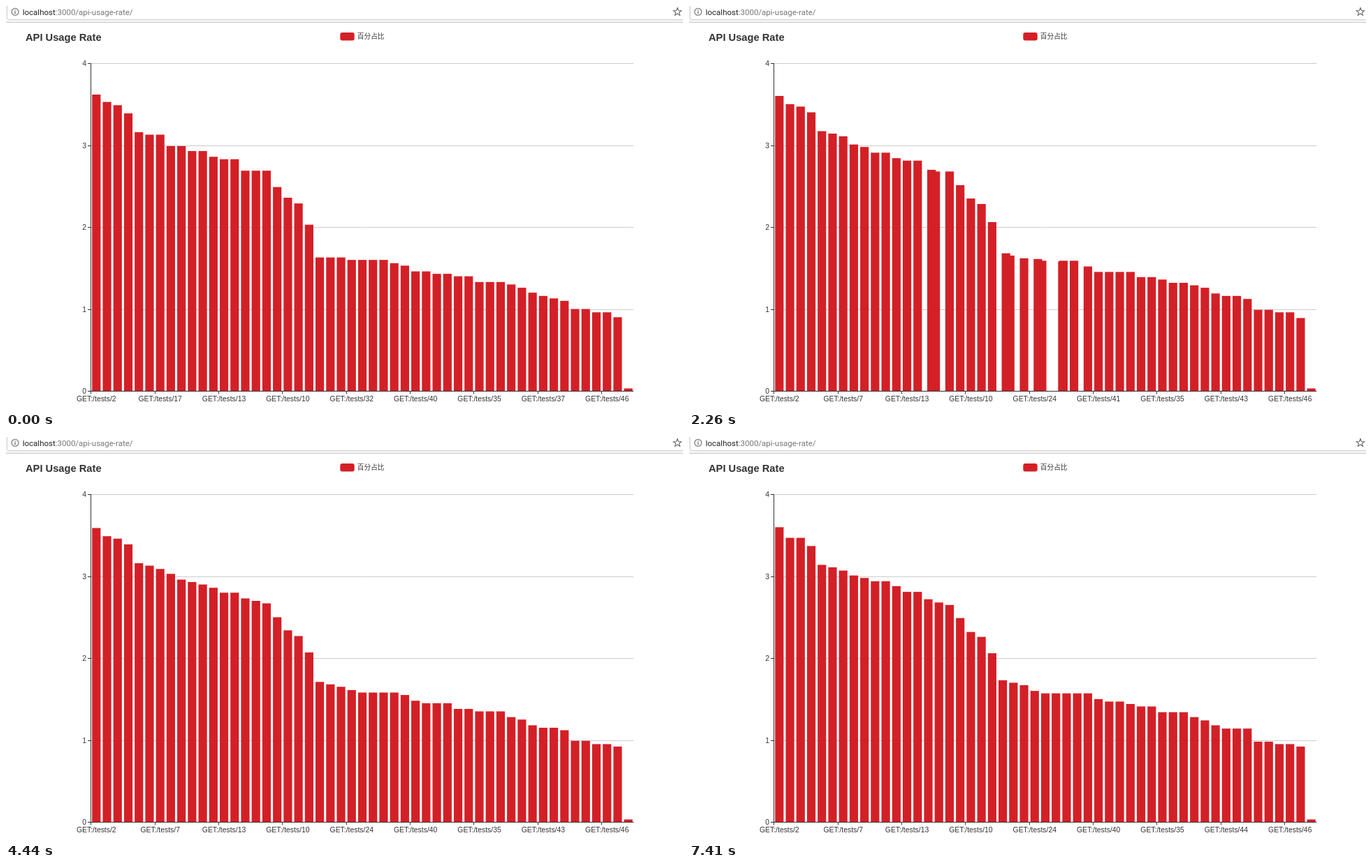
Write an HTML page with a canvas that moves like this. It is 969x578 px and loops after 8 s.

```html
<!DOCTYPE html>
<html lang="en">
<head>
<meta charset="utf-8">
<title>API Usage Rate</title>
<style>
html, body { margin: 0; width: 100%; height: 100%; overflow: hidden; background: #fff; }
canvas { display: block; }
</style>
</head>
<body>
<canvas id="stage" width="969" height="578"></canvas>
<script>
const ctx = document.getElementById('stage').getContext('2d');
const LOOP = 8000, PERIOD = 1000, FIRST_UPDATE = 161, EASE_MS = 300;
const RED = '#d32027', INK = '#333';
const LEFT = 121.7, RIGHT = 898.3, BASE = 552, UNIT = 117.4, LABEL_EVERY = 6;

// Moments at which the screen is refreshed
const REFRESH = [0, 290, 470, 1210, 1360, 1510, 2260, 2430, 3180, 3330, 3480,
  4260, 4440, 5180, 5330, 5480, 6220, 6370, 6520, 7260, 7410];

// Request counts per endpoint, highest first
const COUNTS = [109, 106, 105, 102, 95, 94, 94, 90, 90, 88, 88, 86, 85, 85, 81, 81, 81,
  75, 71, 69, 61, 49, 49, 49, 48, 48, 48, 48, 47, 46, 44, 44, 43, 43, 42, 42, 40, 40, 40,
  39, 38, 36, 35, 34, 33, 30, 30, 29, 29, 27, 1];
const NAMES = { 0: 2, 5: 7, 6: 17, 12: 13, 18: 10, 24: 32, 25: 24, 30: 40, 33: 41,
  36: 35, 42: 37, 43: 44, 44: 43, 48: 46 };

// New requests each second: a rank, or "rank>new rank" when the bar overtakes others
const HITS = [
  '3 6>5 7 21 32 44',
  '5>4 17 22>21 33>30 36 44>42',
  '15>14 20 20 22>21 25>24 28>26',
  '10>9 16>14 23>21 21 29 49',
  '7 11 14 21 31>30 37 38',
  '9 10 11 30 31 44>42',
  '10>9 12 21 23 29>27 34',
  '0 2 8 13 22 32 35'
];

const band = (RIGHT - LEFT) / COUNTS.length;
const states = buildStates();

function snapshot(items) {
  const total = items.reduce((sum, item) => sum + item.count, 0);
  const bars = [];
  items.forEach((item, rank) => {
    bars[item.id] = { rank, value: Math.round(1e4 * item.count / total) / 100 };
  });
  return { bars, names: items.map(item => NAMES[item.id]) };
}

function buildStates() {
  const items = COUNTS.map((count, id) => ({ id, count }));
  const list = [snapshot(items)];
  for (const second of HITS) {
    for (const hit of second.split(' ')) {
      const [from, to = from] = hit.split('>').map(Number);
      const [item] = items.splice(from, 1);
      item.count++;
      items.splice(to, 0, item);
    }
    list.push(snapshot(items));
  }
  return list;
}

function text(str, x, y, font, color = INK, align = 'left') {
  ctx.font = font;
  ctx.fillStyle = color;
  ctx.textAlign = align;
  ctx.fillText(str, x, y);
}

function line(x1, y1, x2, y2, color, width = 1) {
  ctx.strokeStyle = color;
  ctx.lineWidth = width;
  ctx.beginPath();
  ctx.moveTo(x1, y1);
  ctx.lineTo(x2, y2);
  ctx.stroke();
}

function roundBox(x, y, w, h, r) {
  ctx.beginPath();
  ctx.roundRect(x, y, w, h, r);
}

function drawStar(cx, cy, r) {
  ctx.beginPath();
  for (let i = 0; i < 10; i++) {
    const a = -Math.PI / 2 + i * Math.PI / 5, d = i % 2 ? r * 0.42 : r;
    ctx.lineTo(cx + d * Math.cos(a), cy + d * Math.sin(a));
  }
  ctx.closePath();
  ctx.strokeStyle = '#666';
  ctx.lineWidth = 1.1;
  ctx.stroke();
}

function drawAddressBar() {
  const font = '11.5px Roboto, sans-serif';
  ctx.fillStyle = '#f4f4f4';
  ctx.fillRect(0, 0, 969, 23);
  roundBox(1.5, -12, 990, 31.5, 4);
  ctx.fillStyle = '#fff';
  ctx.fill();
  ctx.strokeStyle = '#cfcfcf';
  ctx.lineWidth = 1;
  ctx.stroke();
  line(0, 23.5, 969, 23.5, '#cacaca');

  ctx.strokeStyle = '#666';
  ctx.lineWidth = 1.1;
  ctx.beginPath();
  ctx.arc(13, 8.3, 5, 0, 7);
  ctx.stroke();
  line(13, 7.5, 13, 11.2, '#666', 1.3);
  line(13, 5.3, 13, 6.6, '#666', 1.3);

  text('localhost', 23.7, 12.6, font, '#222');
  const host = ctx.measureText('localhost').width;
  text(':3000/api-usage-rate/', 23.7 + host, 12.6, font, '#777');
  drawStar(961, 8.5, 6);
}

function drawHeader() {
  text('API Usage Rate', 28, 50.2, 'bold 14.7px "Liberation Sans", sans-serif');
  roundBox(478.3, 38, 20.4, 11.4, 3);
  ctx.fillStyle = RED;
  ctx.fill();
  text('百分占比', 502.8, 47.2, '9.7px "Noto Sans CJK SC", "Noto Sans CJK", sans-serif');
}

function drawAxes(names) {
  const font = '10.4px "Liberation Sans", sans-serif';
  for (let v = 0; v <= 4; v++) {
    const y = Math.round(BASE - v * UNIT) + 0.5;
    line(117, y, 122, y, INK);
    text(v, 115, y + 3.4, font, INK, 'right');
  }
  line(121.5, 82, 121.5, BASE + 1, INK);
  line(121, BASE + 0.5, RIGHT, BASE + 0.5, INK);
  for (let i = 0; i < names.length; i += LABEL_EVERY) {
    const x = LEFT + i * band;
    line(Math.floor(x) + 0.5, BASE, Math.floor(x) + 0.5, BASE + 4.5, INK);
    text('GET:/tests/' + names[i], x + band / 2, 566.8, font, INK, 'center');
  }
}

function drawBars(before, after, p) {
  const mix = (a, b) => a + (b - a) * p;
  ctx.fillStyle = RED;
  after.bars.forEach((bar, id) => {
    const old = before.bars[id];
    const x = LEFT + (mix(old.rank, bar.rank) + 0.1) * band;
    const h = mix(old.value, bar.value) * UNIT;
    ctx.fillRect(x, BASE - h, band * 0.8, h);
  });
}

function draw(time) {
  const clock = time + PERIOD - FIRST_UPDATE;
  const step = Math.floor(clock / PERIOD);
  const progress = Math.min(1, clock % PERIOD / EASE_MS);
  const after = states[step], before = states[Math.max(0, step - 1)];

  ctx.fillStyle = '#fff';
  ctx.fillRect(0, 0, 969, 578);
  drawAddressBar();
  drawHeader();
  for (let v = 1; v <= 4; v++) {
    const y = Math.round(BASE - v * UNIT) + 0.5;
    line(122, y, RIGHT, y, '#ccc');
  }
  drawBars(before, after, 1 - (1 - progress) ** 3);
  drawAxes(after.names);
}

function tick() {
  const now = performance.now() % LOOP;
  draw(REFRESH.findLast(t => t <= now));
  requestAnimationFrame(tick);
}
tick();
</script>
</body>
</html>
```
